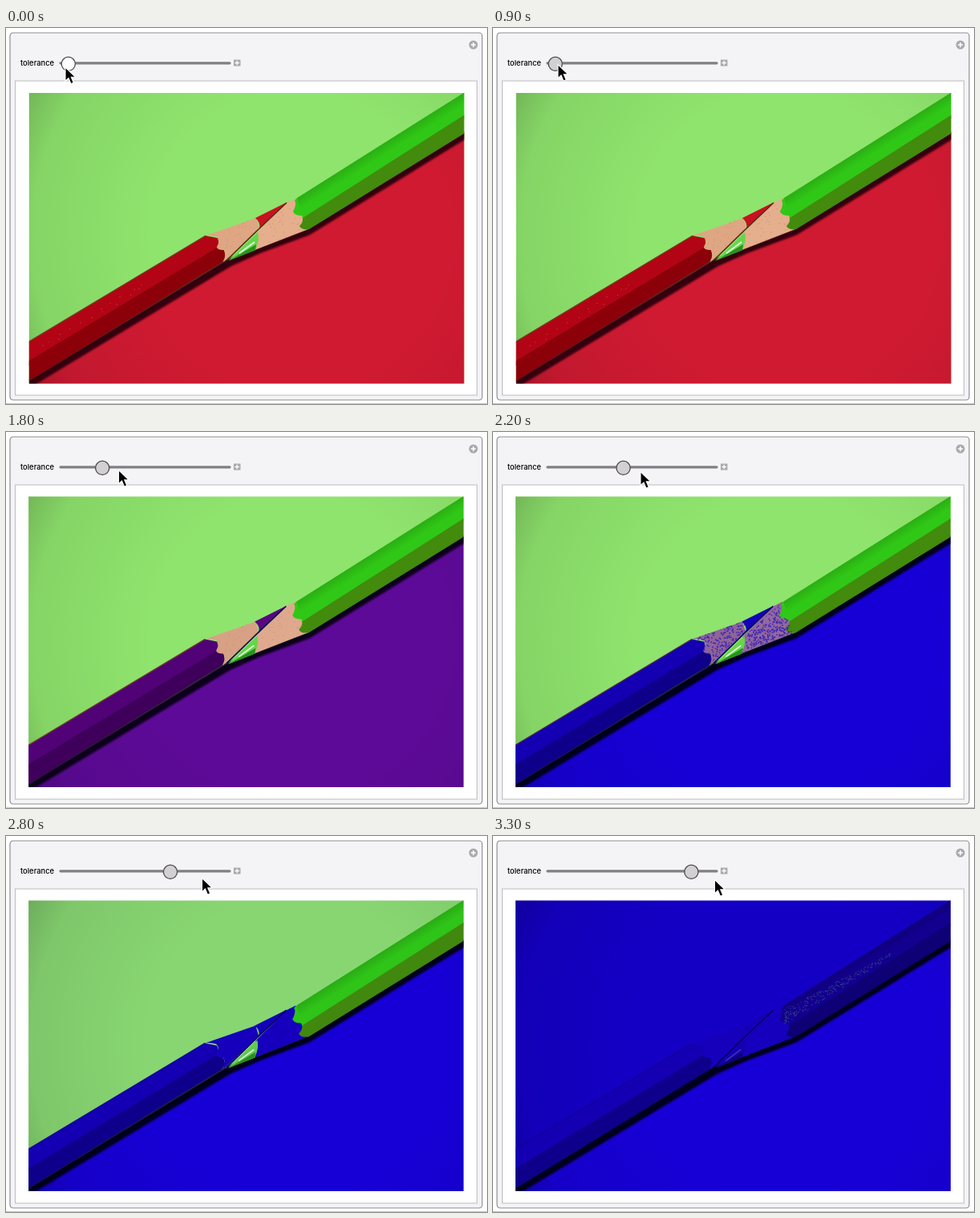
Animation, 600 px wide and 469 px high, one loop 3400 ms. Source, as an HTML page:

```html
<!DOCTYPE html>
<html lang="en">
<head>
<meta charset="utf-8">
<title>Tolerance slider</title>
<style>
  html, body { margin: 0; width: 100%; height: 100%; overflow: hidden; background: #fff; }
  svg { display: block; width: 600px; height: 469px; }
  text { font: 500 9.4px Inter, Roboto, sans-serif; }
</style>
</head>
<body>
<svg id="stage" viewBox="0 0 600 469" xmlns="http://www.w3.org/2000/svg">
  <defs>
    <clipPath id="photoClip"><rect x="28.8" y="81" width="542.6" height="362.5"/></clipPath>
    <clipPath id="woodClip">
      <path d="M249 259 L314 236 L316 249 L272 290 L272 277 L263 274 L265 265 Z M360 214 L317 252 L311 276 L374 252 L369 235 L358 229 Z"/>
    </clipPath>
    <radialGradient id="vignette" gradientUnits="userSpaceOnUse" cx="360" cy="260" r="400">
      <stop offset=".45" stop-opacity="0"/>
      <stop offset=".82" stop-opacity=".07"/>
      <stop offset="1" stop-opacity=".26"/>
    </radialGradient>
    <linearGradient id="barrelShade" gradientUnits="userSpaceOnUse" x1="460" y1="152" x2="479" y2="182">
      <stop offset="0" stop-opacity=".12"/>
      <stop offset=".35" stop-opacity="0"/>
      <stop offset="1" stop-opacity="0"/>
    </linearGradient>
    <filter id="soft" x="-5%" y="-5%" width="110%" height="110%"><feGaussianBlur stdDeviation=".9"/></filter>
  </defs>

  <rect width="600" height="469" fill="#fff"/>
  <path d="M0 468.5H600" stroke="#c4c4c4"/>
  <rect x="5" y="6" width="589" height="458" rx="4" fill="#f4f3f6" stroke="#8f8f91" stroke-width="1.2"/>
  <rect x="11.5" y="66" width="576" height="392" fill="#fff" stroke="#bdbcbf"/>
  <circle cx="583" cy="21" r="5.5" fill="#aaa9ab"/>
  <path d="M580 21h6M583 18v6" stroke="#fff" stroke-width="1.5"/>
  <text x="18" y="47">tolerance</text>
  <path d="M68 43.8H279" stroke="#827f84" stroke-width="3.2" stroke-linecap="round"/>
  <rect x="284" y="39.5" width="8.5" height="8" fill="#aaa9ab"/>
  <path d="M285.5 43.5h5.5M288.2 40.8v5.5" stroke="#fff" stroke-width="1.3"/>

  <g id="photo">
    <g clip-path="url(#photoClip)">
      <g id="scene"></g>
    </g>
  </g>

  <circle id="thumb" cy="44.8" r="8.6" stroke="#4b494d" stroke-width="1.3"/>
  <path id="cursor" d="M0 0V17.2L4 13.5L7 20.6L10.3 19.2L7.3 12.3H12.8Z" stroke="#fff" stroke-width="1.1"/>
</svg>
<script>
const LOOP = 3400, STEP = 100;
const NS = 'http://www.w3.org/2000/svg';
const byId = id => document.getElementById(id);
const scene = byId('scene');

// Share of recolouring for each material at slider notches 0 to 8.
const recolour = {
  red:    [0, .09, .62, .95, 1, 1, 1, 1, 1],
  shadow: [0, .5, .9, 1, 1, 1, 1, 1, 1],
  wood:   [0, 0, .03, .12, .4, .85, 1, 1, 1],
  paper:  [0, 0, 0, 0, 0, .01, .06, .65, 1],
  green:  [0, 0, 0, 0, 0, 0, .02, .3, 1]
};
const notchTimes = [1400, 1700, 2000, 2200, 2400, 2600, 2900, 3100];
const cursorKeys = [
  [0, 74, 49], [500, 80, 46], [900, 81, 45.5], [1200, 91, 46], [1500, 114, 47],
  [1800, 140.5, 47.5], [2200, 184, 49.5], [2800, 244.5, 52.5], [3300, 276.5, 54.5]
];

function add(d, attrs = {}) {
  const path = document.createElementNS(NS, 'path');
  path.setAttribute('d', d);
  for (const [name, value] of Object.entries(attrs)) path.setAttribute(name, value);
  scene.appendChild(path);
  return path;
}

const parts = [];
function part(material, from, to, d, attrs = {}, paint = 'fill') {
  parts.push({ path: add(d, attrs), material, from, to, paint });
}

let seed = 7;
function random() {
  seed = (seed * 16807) % 2147483647;
  return seed / 2147483647;
}
function specks(count, place, size) {
  let d = '';
  for (let i = 0; i < count; i++) {
    const [x, y] = place();
    d += `M${x.toFixed(1)} ${y.toFixed(1)}h${size}v${size}h-${size}z`;
  }
  return d;
}
const overWood = () => {
  const x = 249 + random() * 125;
  return [x, 267 - (x - 249) * .3 + (random() - .5) * 62];
};

const soft = { filter: 'url(#soft)' };
const line = width => ({ fill: 'none', 'stroke-width': width });

// Papers and shadows
part('paper', [143, 228, 109], [20, 0, 197], 'M28 80H572V444H28Z');
part('red', [208, 26, 50], [23, 0, 214], 'M28 444L278 292L376 254L572 130V444Z');
add('M28 80H572V444H28Z', { fill: 'url(#vignette)' });
part('shadow', [54, 0, 10], [5, 0, 28],
  'M20 444L274 289L312 275L376 250L576 127V137L379 258L317 281L281 297L36 445Z', soft);

// Red pencil
part('red', [178, 4, 20], [20, 0, 178], 'M24 394L249 259L264 262L266 269L263 275L272 278L24 424Z');
part('red', [139, 0, 9], [15, 0, 139], 'M24 418L263 274L272 277L274 285L270 292L24 443Z');
part('wood', [112, 62, 32], [18, 0, 150], 'M24 394L249 259', line(1.3), 'stroke');
part('wood', [222, 166, 131], [22, 0, 188],
  'M249 259L312 237L316 250L271 292Q275 283 272 277Q263 277 263 273Q268 264 263 260Q256 258 249 259Z');
part('red', [199, 18, 32], [20, 0, 185], 'M311 237L351 217L316 250Q318 243 311 237Z');

// Green pencil
part('wood', [229, 174, 140], [22, 0, 190],
  'M362 212L350 218L312 256L310 277L377 251L369 234Z');
part('paper', [101, 214, 74], [20, 0, 170], 'M278 290L314 255Q317 263 311 277Z');
part('green', [40, 146, 28], [14, 0, 120], 'M278 290L312 270L311 277Z');
part('paper', [231, 250, 222], [60, 50, 190], 'M291 281L310 267', line(1.8), 'stroke');
part('shadow', [91, 39, 22], [8, 0, 95], 'M350 218L313 253L276 289', line(1.6), 'stroke');
part('green', [48, 200, 22], [18, 0, 143],
  'M363 212L574 79V112L371 240L369 234Q360 234 358 229Q363 220 360 215Z');
add('M363 212L574 79V112L371 240Z', { fill: 'url(#barrelShade)' });
part('green', [66, 139, 13], [14, 0, 117],
  'M370 237L574 107V130L378 251Q368 252 366 247Q371 242 370 237Z');

// Grain
const flecks = add(specks(130, overWood, 1.2), { 'clip-path': 'url(#woodClip)', fill: '#b98566' });
const blueGrain = add(specks(900, overWood, 1.6), { 'clip-path': 'url(#woodClip)', fill: '#2410b4' });
const barrelDots = add(specks(260, () => {
  const along = random() ** 1.3;
  return [364 + along * 132, 216 - along * 70 + random() * (19 - along * 14)];
}, 1), { fill: '#53717f' });
const dust = add(specks(16, () => {
  const along = random() ** 2;
  return [45 + along * 190, 391 - along * 112 + random() * 9];
}, 1.2), { fill: '#d9606a' });

const mix = (a, b, share) => a + (b - a) * share;

function cursorAt(t) {
  let i = 1;
  while (i < cursorKeys.length - 1 && t > cursorKeys[i][0]) i++;
  const [t0, x0, y0] = cursorKeys[i - 1], [t1, x1, y1] = cursorKeys[i];
  const share = Math.min(1, (t - t0) / (t1 - t0));
  return [mix(x0, x1, share), mix(y0, y1, share)];
}

function draw(time) {
  const t = Math.floor((time % LOOP) / STEP) * STEP;
  const notch = notchTimes.filter(start => t >= start).length;

  for (const { path, material, from, to, paint } of parts) {
    const share = recolour[material][notch];
    const rgb = from.map((c, i) => Math.round(mix(c, to[i], share)));
    path.setAttribute(paint, `rgb(${rgb})`);
  }
  flecks.setAttribute('opacity', notch < 4 ? .55 : 0);
  blueGrain.setAttribute('opacity', [0, 0, 0, .12, .75, .6, 0, 0, 0][notch]);
  barrelDots.setAttribute('opacity', notch === 8 ? .65 : 0);
  dust.setAttribute('opacity', notch < 2 ? .6 : 0);

  byId('photo').setAttribute('transform', notch ? 'translate(-.7 -.6)' : '');
  byId('thumb').setAttribute('cx', 77.8 + notch * 21.2);
  byId('thumb').setAttribute('fill', t < 400 ? '#fff' : '#d2d0d3');
  byId('cursor').setAttribute('transform', `translate(${cursorAt(t)})`);
}

const start = performance.now();
function tick() {
  draw(performance.now() - start);
  requestAnimationFrame(tick);
}
tick();
</script>
</body>
</html>
```
